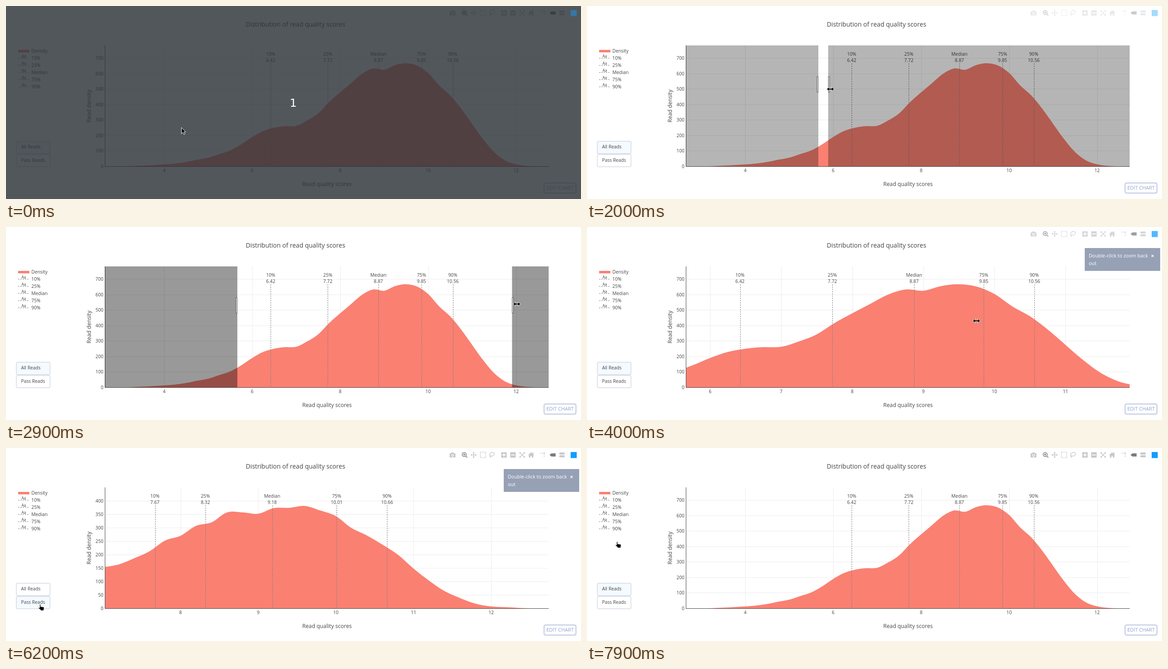
An HTML page for the animation above (8 s loop, 1280 by 431 pixels).

```html
<!DOCTYPE html>
<html lang="en">
<head>
<meta charset="utf-8">
<title>Read quality scores</title>
<style>
  html, body { margin: 0; width: 100%; height: 100%; overflow: hidden; background: #fff; }
  svg { display: block; width: 1280px; height: 431px; font: 10.3px "Open Sans", sans-serif; fill: #444; }
  .grid { stroke: #ececec; }
  .axis { stroke: #444; }
  .dash { stroke: #7f7f7f; stroke-dasharray: 3 2; }
  .mid { text-anchor: middle; }
  .end { text-anchor: end; }
  .density { fill: #fa8072; }
  .icon { fill: #c7c7c7; stroke: none; }
  .line { fill: none; stroke: #c7c7c7; stroke-width: 1.5; }
  .on .icon { fill: #7c7c7c; }
  .on .line { stroke: #7c7c7c; }
  .button { stroke: #bec8d9; }
  .handle { fill: #fff; stroke: #444; }
</style>
</head>
<body>
<svg id="stage" viewBox="0 0 1280 431"></svg>
<script>
const LOOP = 8000, STEP = 100;
const LEFT = 220, RIGHT = 1208, TOP = 88, BASE = 358;

// Each density is sampled at an even spacing in quality score.
const marks = ["10%", "25%", "Median", "75%", "90%"];
const all = {
  lo: 2.65, hi: 12.74, step: 2, yStep: 100, yMax: 700, yScale: .345,
  scores: [6.42, 7.72, 8.87, 9.85, 10.56],
  from: 2.5, spacing: .25,
  density: [0, 0, 0, 1, 4, 8, 12, 18, 28, 43, 56, 79, 103, 142, 190, 229, 250, 260, 262, 297, 343,
    416, 479, 539, 599, 633, 625, 655, 667, 652, 604, 524, 460, 374, 275, 176, 92, 38, 13, 3, 0, 0]
};
const zoomed = { ...all, lo: 5.658, hi: 11.903, step: 1 };
const pass = {
  lo: 7.025, hi: 12.74, step: 1, yStep: 50, yMax: 400, yScale: .6,
  scores: [7.67, 8.32, 9.18, 10.01, 10.66],
  from: 7, spacing: .2,
  density: [153, 163, 186, 212, 252, 270, 307, 320, 357, 357, 352, 373, 374, 381, 364, 343, 299,
    271, 237, 199, 148, 103, 64, 38, 17, 7, 4, 1, 0, 0]
};

// Eased pointer moves: start time, end time, destination.
const moves = [
  [0, 300, 371, 245], [400, 700, 392, 214.5], [700, 1300, 519, 188], [1300, 1400, 527, 187],
  [1500, 1600, 523, 186], [1890, 2870, 1137, 172], [3200, 4000, 867, 209.5], [4200, 4800, 89, 348],
  [4900, 5100, 76, 349], [6200, 6900, 76, 318], [7400, 7700, 68, 235.5], [7800, 7900, 67, 209]];

const clamp = v => Math.max(0, Math.min(1, v));
const mix = (a, b, p) => a + (b - a) * p;
const ramp = (t, start, end) => (1 - Math.cos(Math.PI * clamp((t - start) / (end - start)))) / 2;

function pointerAt(t) {
  let x = 390, y = 271;
  for (const [start, end, toX, toY] of moves) {
    const p = ramp(t, start, end);
    x = mix(x, toX, p);
    y = mix(y, toY, p);
  }
  return [x, y];
}

const text = (x, y, s, cls = "", more = "") => `<text x="${x}" y="${y}" class="${cls}" ${more}>${s}</text>`;
const line = (x1, y1, x2, y2, cls) => `<line x1="${x1}" y1="${y1}" x2="${x2}" y2="${y2}" class="${cls}"/>`;
const rect = (x, y, w, h, more = "") => `<rect x="${x}" y="${y}" width="${w}" height="${h}" ${more}/>`;
const crisp = v => Math.round(v) + .5;

function smoothPath(points) {
  const at = i => points[Math.max(0, Math.min(points.length - 1, i))];
  let d = `M${points[0]}`;
  for (let i = 0; i < points.length - 1; i++) {
    const [p, a, b, n] = [at(i - 1), at(i), at(i + 1), at(i + 2)];
    d += `C${[0, 1].map(k => a[k] + (b[k] - p[k]) / 6)} ${[0, 1].map(k => b[k] - (n[k] - a[k]) / 6)} ${b}`;
  }
  return d;
}

function drawChart(v) {
  const px = q => LEFT + (q - v.lo) / (v.hi - v.lo) * (RIGHT - LEFT);
  const py = n => BASE - n * v.yScale;
  const points = v.density.map((n, i) => [px(v.from + i * v.spacing), py(n)]);
  let grid = "", labels = "", guides = "";
  for (let q = Math.ceil(v.lo / v.step) * v.step; q < v.hi; q += v.step) {
    grid += line(crisp(px(q)), TOP, crisp(px(q)), BASE, "grid");
    labels += text(px(q), 371.2, q, "mid");
  }
  for (let n = 0; n <= v.yMax; n += v.yStep) {
    if (n) grid += line(LEFT, crisp(py(n) - .5), RIGHT, crisp(py(n) - .5), "grid");
    labels += text(217, py(n) + 3.9, n, "end");
  }
  v.scores.forEach((q, i) => {
    const x = px(q);
    guides += line(crisp(x), 128, crisp(x), BASE, "dash")
      + text(x, 111, marks[i], "mid") + text(x, 124.7, q, "mid");
  });
  const first = points[0][0], last = points[points.length - 1][0];
  return grid + `<path class="density" clip-path="url(#plot)" d="${smoothPath(points)}L${last} ${BASE}H${first}Z"/>`
    + guides + labels + line(220.5, TOP, 220.5, 359, "axis") + line(LEFT, 358.5, RIGHT, 358.5, "axis");
}

function drawLegend() {
  let s = rect(27, 98, 25, 5.5, 'class="density"') + text(56.5, 104.3, "Density");
  marks.forEach((m, i) => {
    const y = 116.5 + 16 * i;
    s += line(27, y, 50, y, "dash") + text(39.5, y - 1.7, "Aa", "mid", 'font-size="8.6"')
      + text(56.5, y + 3.9, m);
  });
  return s;
}

function drawIcons() {
  const icon = (x, body, on) => `<g transform="translate(${x} 15.5)" class="${on ? "on" : ""}">${body}</g>`;
  const solid = d => `<path class="icon" fill-rule="evenodd" d="${d}"/>`;
  const stroke = (d, more = "") => `<path class="line" d="${d}" ${more}/>`;
  const box = "M-6-6H6V6H-6Z";
  const tag = y => `M-6.5 ${y}l3-2.2H6.5v4.4H-3.5Z`;
  return icon(994, solid("M-6.5-3.5h3l1.5-2h4l1.5 2h3v9h-13ZM0-2a3 3 0 1 0 .01 0Z")
      + '<circle class="icon" cy="1" r="1.7"/>')
    + icon(1021, '<circle class="line" cx="-1" cy="-1" r="4.6" stroke-width="2"/>'
      + stroke("M2.3 2.3L6 6M-3.4-1h4.8M-1-3.4v4.8"), true)
    + icon(1041, stroke("M-5 0H5M0-5V5") + solid("M-7 0l3-2.5v5ZM7 0l-3-2.5v5ZM0-7l-2.5 3h5ZM0 7l-2.5-3h5Z"))
    + icon(1062, stroke(box, 'stroke-dasharray="2 1.4"'))
    + icon(1082, '<ellipse class="line" cx=".5" cy="-1.5" rx="5.5" ry="4" transform="rotate(-15)"/>'
      + stroke("M-4 1q-2 2 0 3t0 2"))
    + icon(1108.5, solid(box + "M-1-4V-1H-4V1H-1V4H1V1H4V-1H1V-4Z"))
    + icon(1128.5, solid(box + "M-4-1V1H4V-1Z"))
    + icon(1149, stroke("M-4-4L4 4M4-4L-4 4") + solid("M-6-6h4l-4 4ZM6-6v4l-4-4ZM-6 6v-4l4 4ZM6 6h-4l4-4Z"))
    + icon(1169, solid("M0-6L7 .5H5V6H1.5V2H-1.5V6H-5V.5H-7L0-6ZM3-5.5h2v4l-2-2Z"))
    + icon(1195, stroke("M-5-4H3M3-1V6", 'stroke-dasharray="2 1.5"') + '<circle class="icon" cx="3" cy="-4" r="1.6"/>')
    + icon(1217, solid("M-7 0l4-3.5H6.5v7H-3Z"), true)
    + icon(1237, solid(tag(-3.2) + tag(3)));
}

const pointers = {
  arrow: '<path d="M.5 .5V14L3.7 11 6 16 8.3 15 6 10.2H10Z" fill="#000" stroke="#fff"/>',
  resize: '<path d="M-8 0L-3-5V-1.6H3V-5L8 0 3 5V1.6H-3V5Z" fill="#000" stroke="#fff" stroke-width=".9"/>',
  hand: '<path d="M-1 1Q0-1 1.2 1V5.2L8 6.2Q9 6.5 8.8 8L8 12V14H1V12.5L-3.6 8.8Q-4 7-2 7.4L-1 8Z" fill="#000" stroke="#fff" stroke-width=".8"/>'
};

const stage = document.getElementById("stage");
stage.innerHTML = `<defs><clipPath id="plot">${rect(LEFT, TOP, RIGHT - LEFT, BASE - TOP)}</clipPath></defs>`
  + rect(0, 0, 1280, 431, 'fill="#fff"')
  + text(644.5, 46, "Distribution of read quality scores", "mid", 'font-size="14.05"')
  + text(714.5, 401.8, "Read quality scores", "mid", 'font-size="12.25"')
  + text(0, 0, "Read density", "mid", 'font-size="12.25" transform="translate(188.8 223.3) rotate(-90)"')
  + drawLegend()
  + rect(23, 302, 75, 27.5, 'id="allButton" class="button" rx="2"')
  + rect(23, 331.5, 75, 27.5, 'id="passButton" class="button" rx="2"')
  + text(33.5, 318.3, "All Reads") + text(33.5, 347.8, "Pass Reads")
  + rect(1197.8, 395.2, 71, 22.6, 'rx="3" fill="#fff" stroke="#7a8fc4"')
  + text(1233.4, 410.4, "EDIT CHART", "mid", 'font-size="11" fill="#8ea3d0"')
  + '<g id="chart"></g>'
  + `<g id="selection"><path id="shade"/><path id="handles" class="handle"/></g>`
  + `<g id="modebar">${drawIcons()}</g>`
  + `<g id="notice">${rect(1108, 47, 168, 51, 'fill="#8c97af" fill-opacity=".9"')}
      <g fill="#fff" font-size="10.8">${text(1117, 68.2, "Double-click to zoom back")}${text(1117, 85.2, "out")}
      ${text(1259, 68.5, "×", "mid", 'font-size="13" font-weight="700"')}</g></g>`
  + `<g id="countdown">${rect(0, 0, 1280, 431, 'fill="#2d3239" fill-opacity=".82"')}
      ${text(639.5, 224.5, "1", "mid", 'font-size="25" fill="#fff" font-family="DejaVu Sans, sans-serif"')}</g>`
  + rect(1257, 9, 13.5, 13.5, 'id="logo" fill="#119dff"')
  + '<g id="pointer"></g>';

const el = id => document.getElementById(id);
const fade = (id, v) => el(id).setAttribute("opacity", v);
let shownView, shownPointer;

function update(t) {
  const view = t >= 3200 && t < 4200 ? zoomed : t >= 5500 && t < 7100 ? pass : all;
  if (view !== shownView) el("chart").innerHTML = drawChart(shownView = view);

  // The toolbar hides while dragging and dips during the double-click.
  const dim = clamp(1 - t / 300);
  const bar = 1 - ramp(t, 1850, 2110) + ramp(t, 3200, 3500)
    - .55 * (ramp(t, 3900, 4100) - ramp(t, 4150, 4450));
  fade("countdown", dim);
  fade("modebar", bar);
  fade("logo", bar * (1 - .55 * dim));
  fade("notice", ramp(t, 3200, 3900) - ramp(t, 6200, 6900));

  const [x, y] = pointerAt(t);
  const overAll = x < 99 && y > 301 && y < 330, overPass = x < 99 && y > 331;
  el("allButton").setAttribute("fill", view !== pass || overAll ? "#f4faff" : "#fff");
  el("passButton").setAttribute("fill", view === pass || overPass ? "#f4faff" : "#fff");

  const selecting = t >= 1900 && t < 3200;
  fade("selection", selecting ? 1 : 0);
  if (selecting) {
    const start = 515, edge = mix(start, 1126.5, ramp(t, 1880, 2870));
    el("shade").setAttribute("d", `M${LEFT} ${TOP}H${start}V${BASE}H${LEFT}ZM${edge} ${TOP}H${RIGHT}V${BASE}H${edge}Z`);
    el("shade").setAttribute("fill", `rgba(0,0,0,${.4 * ramp(t, 1870, 2070)})`);
    el("handles").setAttribute("d", `M${start - .5} 157.5h-2.5v35h2.5ZM${edge + .5} 157.5h2.5v35h-2.5Z`);
  }

  const inPlot = x > LEFT && x < RIGHT && y > TOP && y < BASE;
  const kind = t < 100 ? "arrow" : x < 100 ? "hand" : inPlot ? "resize" : "arrow";
  if (kind !== shownPointer) el("pointer").innerHTML = pointers[shownPointer = kind];
  el("pointer").setAttribute("transform", `translate(${x} ${y})`);
}

const begin = performance.now();
function tick() {
  const t = (performance.now() - begin) % LOOP;
  update(Math.floor(t / STEP) * STEP);
  requestAnimationFrame(tick);
}
tick();
</script>
</body>
</html>
```
